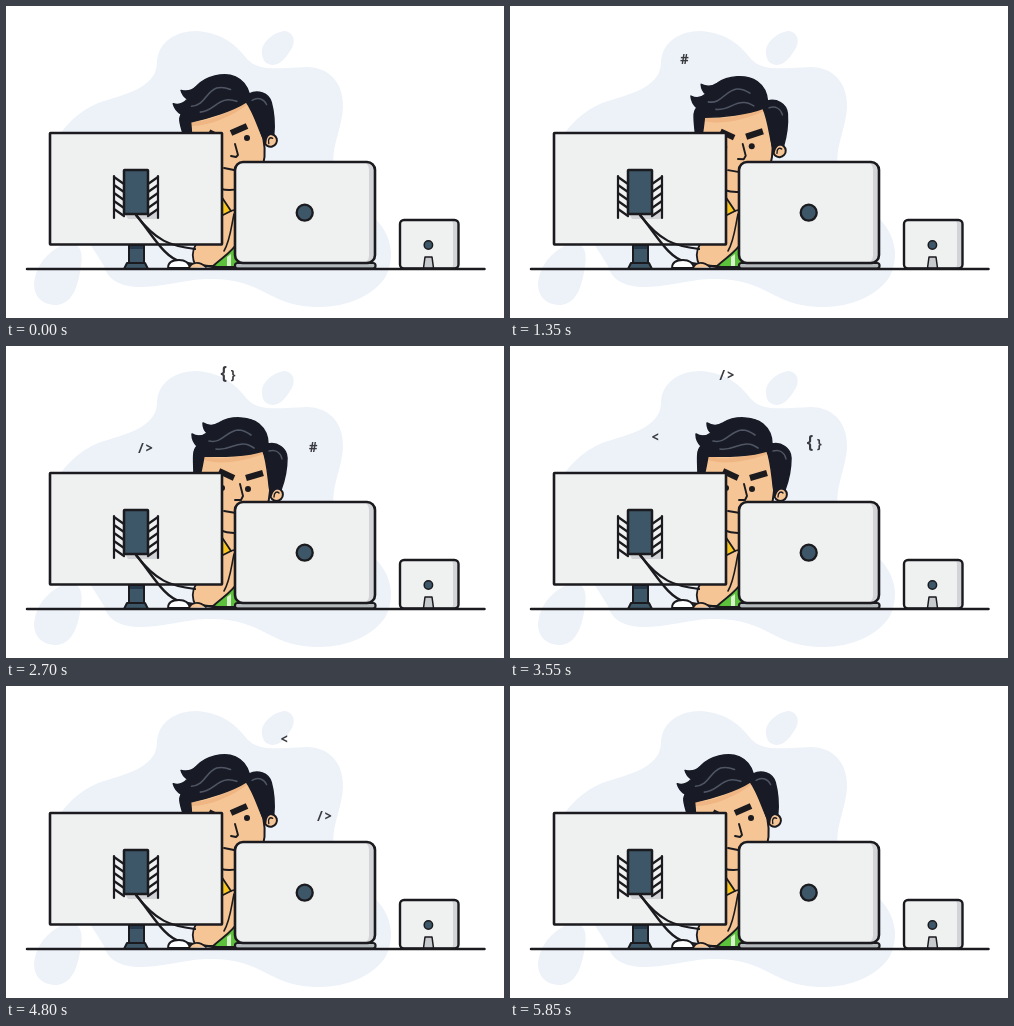
These frames come from a looping animation (498x312 px, 5900 ms). An HTML page with a canvas:

```html
<!DOCTYPE html>
<html lang="en">
<head>
<meta charset="utf-8">
<title>Coder at the desk</title>
<style>
  html, body { margin: 0; width: 100%; height: 100%; overflow: hidden; background: #fff; }
  canvas { display: block; width: 498px; height: 312px; }
</style>
</head>
<body>
<canvas id="stage"></canvas>
<script>
const W = 498, H = 312, LOOP = 5900;
const INK = '#1b1a1e', SKIN = '#f6c595', SHADE = '#efb684', HAIR = '#181b25', GLEAM = '#4f5564';
const SHELL = '#eff0f0', GREY = '#d2d4d7', STEEL = '#3d5668', BLOB = '#edf2f9';

const canvas = document.getElementById('stage');
const ratio = window.devicePixelRatio || 1;
canvas.width = W * ratio;
canvas.height = H * ratio;
const ctx = canvas.getContext('2d');
ctx.scale(ratio, ratio);
ctx.lineJoin = ctx.lineCap = 'round';

const clamp = x => Math.min(1, Math.max(0, x));
const ease = x => { x = clamp(x); return x * x * (3 - 2 * x); };
const mix = (a, b, k) => a + (b - a) * k;

function shape(path, fill, width = 0, stroke = INK) {
  const p = typeof path === 'string' ? new Path2D(path) : path;
  if (fill) { ctx.fillStyle = fill; ctx.fill(p); }
  if (width) { ctx.lineWidth = width; ctx.strokeStyle = stroke; ctx.stroke(p); }
}

function box(x, y, w, h, r, fill, width) {
  const p = new Path2D();
  p.roundRect(x, y, w, h, r);
  shape(p, fill, width);
}

function disc(x, y, r, fill, width) {
  const p = new Path2D();
  p.arc(x, y, r, 0, 2 * Math.PI);
  shape(p, fill, width);
}

function backdrop() {
  ctx.fillStyle = '#fff';
  ctx.fillRect(0, 0, W, H);
  shape('M151 58C151 36 170 25 190 25C214 26 230 38 241 53C253 66 274 62 300 61C326 61 338 80 337 102' +
    'C335 128 322 145 330 170C338 196 360 200 374 218C388 236 387 256 380 270C368 290 340 301 314 301' +
    'C290 301 278 296 262 288C244 278 226 272 200 273C176 274 154 282 130 281C112 280 101 272 98 260' +
    'L60 200C42 175 40 152 50 134C60 118 72 106 92 97C120 88 149 82 151 58Z', BLOB);
  shape('M28 278C30 258 42 246 58 238C72 234 78 244 75 260C72 282 66 298 50 299C36 299 28 290 28 278Z', BLOB);
  shape('M256 47C255 36 268 26 279 25C287 26 290 34 286 42C281 50 275 59 267 59C260 59 256 54 256 47Z', BLOB);
}

function torso() {
  shape('M208 178L232 178L232 215L208 212Z', SKIN);
  shape('M190 238L217 207L232 203L232 250L208 260L190 260C185 252 186 245 190 238Z', SKIN, 1.8);
  shape('M232 236C226 246 217 251 206 261L232 261Z', '#5cc13b', 1.8);
  shape('M221 251L225 248L225 260L221 260Z', '#d9f3cf');
  shape('M215 190L225 205L215 210Z', '#f8c51c', 1.8);
  shape('M228 208C225 222 224 235 218 245', null, 1.6);
}

// k: 0 leans towards the monitor, 1 sits upright
function head(k) {
  ctx.save();
  ctx.translate(214, 164);
  ctx.rotate((k - 1) * Math.PI / 12);
  ctx.translate(-214, -164);
  disc(270.5, 148.5, 6.4, SKIN, 2);
  shape('M268 151C268 146 271 145 273 147', null, 1.4);
  shape('M189 104L189 150C192 172 208 187 228 187C248 186 262 172 264 145L262 100Z', SKIN, 2);
  shape('M195 108C208 115 234 113 259 103L260 107C236 117 210 119 195 113Z', SHADE);
  shape('M186 88C191 91 197 90 201 87C198 84 197 81 197 77C202 80 208 80 213 77C224 70 243 70 253 78' +
    'C259 83 262 90 262 98C271 96 281 102 281 112C281 124 278 136 275 144C271 141 267 143 265 150' +
    'C262 138 262 118 257 105C242 110 216 111 198 110C197 116 196 122 194 130L188 130' +
    'C188 122 187 112 188 106C189 102 190 101 191 100C188 97 186 93 186 88Z', HAIR, 1.5, HAIR);
  shape('M203 95C216 98 220 85 232 84C238 84 241 86 245 89', null, 1.6, GLEAM);
  shape('M210 103C222 105 228 97 238 98C242 98 245 100 248 102', null, 1.6, GLEAM);
  shape('M263 105C270 103 275 107 276 113', null, 1.4, GLEAM);
  ctx.restore();
  face(k);
}

function face(k) {
  const line = (from, to, width) => {
    ctx.beginPath();
    for (let i = 0; i < from.length; i += 2)
      ctx.lineTo(mix(from[i], to[i], k), mix(from[i + 1], to[i + 1], k));
    ctx.lineWidth = width;
    ctx.strokeStyle = INK;
    ctx.stroke();
  };
  ctx.lineCap = 'butt';
  line([225, 127, 241, 120], [240, 132, 257, 127], 6.2);
  line([203, 126, 213, 131], [213, 125, 228, 132], 5.8);
  ctx.lineCap = 'round';
  disc(mix(241, 242, k), mix(132, 143, k), 3, INK);
  disc(mix(209, 216, k), mix(138, 142, k), 3, INK);
  line([229, 138, 232, 149, 230, 151, 225, 150], [234, 138, 237, 150, 235, 154, 229, 154], 1.9);
  line([218, 162, 228, 164], [218, 165, 230, 167], 1.8);
}

function monitor() {
  box(123, 239, 15, 19, 0, STEEL, 2);
  ctx.fillStyle = '#25394a';
  ctx.fillRect(124, 240, 13, 3);
  shape('M121 257L139 257L142 263L118 263Z', STEEL, 2);
  box(44, 127, 172, 111.5, 0.5, SHELL, 2.6);
  shape('M118 206L152 206L152 213L122 213Z', GREY);
  for (const side of [-1, 1]) {
    const inner = 130 + side * 12, outer = 130 + side * 22;
    for (let i = 0; i < 5; i++) {
      const y = 171 + i * 8;
      shape(`M${outer} ${y}L${inner} ${y + 7}`, null, 2.2);
    }
    shape(`M${outer} 170V212`, null, 2.2);
  }
  box(118, 164, 24, 44, 0.5, STEEL, 2.5);
}

function cables() {
  shape('M130 209C146 228 158 252 176 256C190 259 200 260 210 261', null, 2.4);
  shape('M130 209C150 235 164 240 189 243', null, 2.2);
  shape('M162 262C162 256 167 254 173 254C179 254 183 257 184 262Z', '#fff', 1.8);
  shape('M183 262C186 256 193 255 200 261', SKIN, 1.7);
}

function laptop() {
  box(229, 257, 140.5, 5.5, 2.5, '#b4b9bc', 2.2);
  box(229, 156, 140, 101, 8, GREY);
  box(229, 156, 134, 101, 7, SHELL);
  box(229, 156, 140, 101, 8, null, 2.6);
  disc(298.7, 206.7, 8, STEEL, 2.3);
}

function tablet() {
  box(394, 214, 58.5, 48.5, 4, GREY);
  box(394, 214, 53, 48.5, 4, SHELL);
  box(394, 214, 58.5, 48.5, 4, null, 2.4);
  disc(422.4, 239, 4.2, STEEL, 1.5);
  shape('M419 251L426 251L427.5 262L417.5 262Z', '#c6cacc', 1.5);
}

// flight of a symbol from screen to screen: [ms, x, y]
const FLIGHT = [
  [0, 126, 142], [200, 128, 125], [450, 139, 103], [550, 145, 92.5], [950, 179, 50], [1350, 222, 28],
  [1450, 235, 27], [1800, 278, 54], [2230, 306, 100], [2550, 318, 131], [2850, 325, 168]
];

function along(ms, axis) {
  const last = FLIGHT.length - 1;
  let i = 0;
  while (i < last - 1 && FLIGHT[i + 1][0] < ms) i++;
  const slope = n => {
    const a = FLIGHT[Math.max(0, n - 1)], b = FLIGHT[Math.min(last, n + 1)];
    return (b[axis] - a[axis]) / (b[0] - a[0]);
  };
  const a = FLIGHT[i], b = FLIGHT[i + 1], d = b[0] - a[0], u = (ms - a[0]) / d;
  const s = u * u * (3 - 2 * u);
  return mix(a[axis], b[axis], s) +
    d * u * (1 - u) * ((1 - u) * slope(i) - u * slope(i + 1));
}

function glyph(text, x, y, size) {
  ctx.font = `bold ${size}px "Noto Sans Mono", "DejaVu Sans Mono", monospace`;
  ctx.fillText(text, x, y);
}

const SYMBOLS = [['#', 450], ['{}', 1350], ['/>', 2250], ['<', 3000]];

function symbols(t) {
  ctx.fillStyle = '#3a3b40';
  ctx.textAlign = 'center';
  ctx.textBaseline = 'middle';
  for (const [text, start] of SYMBOLS) {
    const ms = t - start;
    if (ms < 0 || ms > 2850) continue;
    const x = along(ms, 1), y = along(ms, 2);
    if (text === '{}') {
      glyph('{', x - 4.5, y, 17);
      glyph('}', x + 5, y + 1, 13);
    } else {
      glyph(text, x, y, 14);
    }
  }
}

function draw(t) {
  const upright = ease((t - 1050) / 450) - ease((t - 4200) / 450);
  backdrop();
  torso();
  head(upright);
  symbols(t);
  monitor();
  cables();
  laptop();
  tablet();
  shape('M21 263H478.5', null, 2.5);
}

const began = performance.now();
function tick() {
  draw((performance.now() - began) % LOOP);
  requestAnimationFrame(tick);
}
tick();
</script>
</body>
</html>
```
